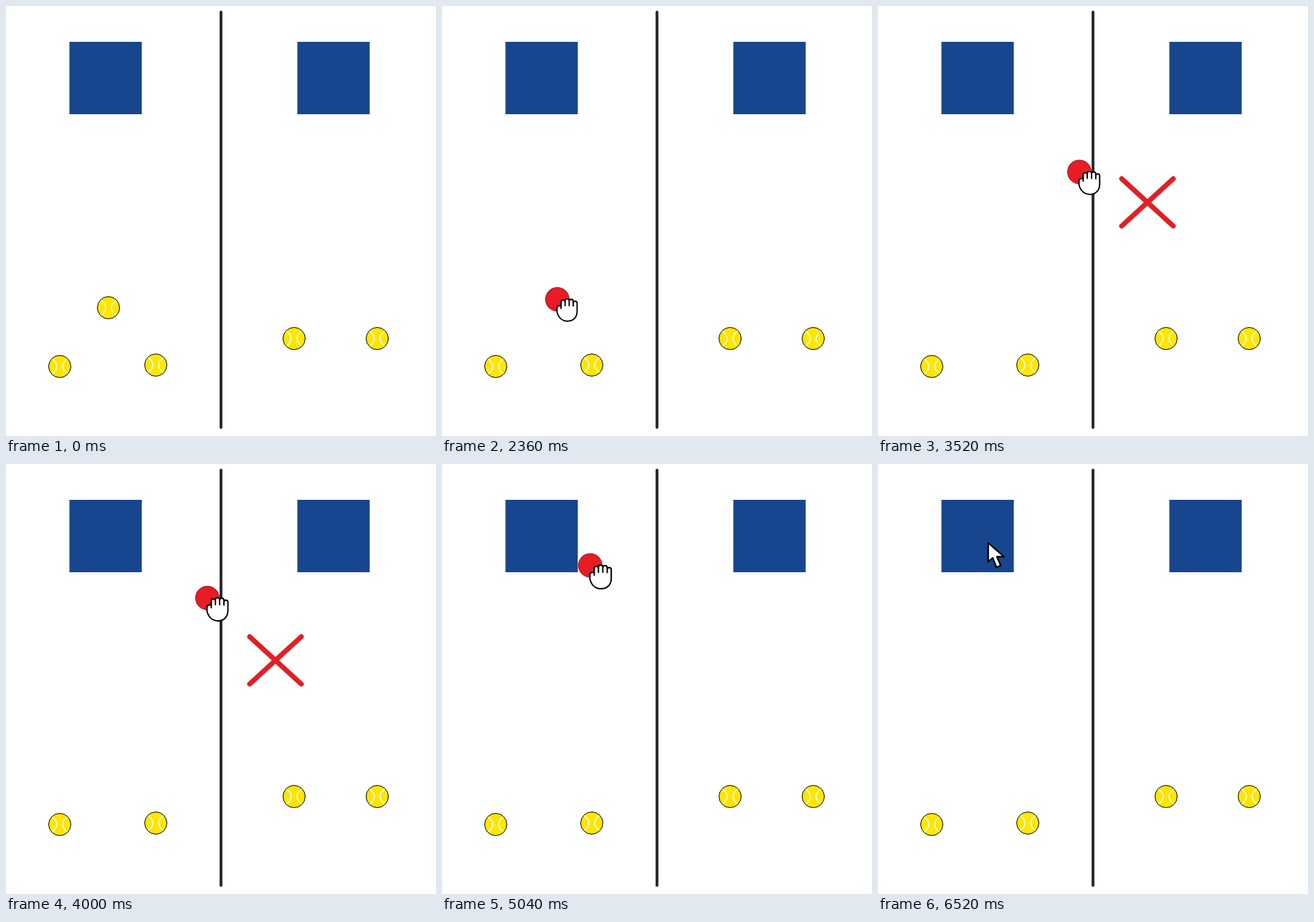
Animation, 600 px wide and 600 px high, one loop 7000 ms. Source, as an HTML page:

```html
<!DOCTYPE html>
<html lang="en">
<head>
<meta charset="utf-8">
<title>Drag and drop</title>
<style>
  html, body { margin: 0; width: 100%; height: 100%; overflow: hidden; background: #fff; }
  svg { display: block; width: 100vw; height: 100vh; }
  .cursor { fill: #fff; stroke: #000; stroke-width: 1.9; stroke-linejoin: round; stroke-linecap: round; }
  .mark { fill: none; stroke-width: 7; stroke-linecap: round; stroke-linejoin: round; }
</style>
</head>
<body>
<svg viewBox="0 0 600 600">
  <defs>
    <g id="tennis">
      <circle r="15.5" fill="#ffe600" stroke="#000"/>
      <path d="M-10.5-10.5Q2.5 0-10.5 10.5M10.5-10.5Q-2.5 0 10.5 10.5" fill="none" stroke="#fff" stroke-width="1.5"/>
    </g>
  </defs>

  <g fill="#17468f">
    <rect x="88.5" y="50" width="101" height="101"/>
    <rect x="406.5" y="50" width="101" height="101"/>
  </g>
  <path d="M300 8.5V588" stroke="#2d2d2f" stroke-width="4" stroke-linecap="round"/>

  <use href="#tennis" x="75" y="503"/>
  <use href="#tennis" x="209" y="501"/>
  <use href="#tennis" x="402" y="464"/>
  <use href="#tennis" x="518" y="464"/>
  <use href="#tennis" x="143" y="421" id="first"/>

  <path id="cross" class="mark" stroke="#e02024" d="M-36-33L36 33M36-33L-36 33"/>
  <path id="check" class="mark" stroke="#22b14c" d="M-32.5 4L-10 26L32.5-26"/>
  <circle id="ball" r="16.3" fill="#e81c24" stroke="#b5202b" stroke-width="1.4"/>

  <g class="cursor">
    <path id="arrow" stroke-width="2.3" fill="#f6f8ff" d="M0 0V26.5L6.3 21L11.6 34.2L17.6 31.6L12.2 19.4H22.2Z"/>
    <path id="point" d="M-2.8 22V3.2a2.8 2.8 0 0 1 5.6 0V12a2.6 2.6 0 0 1 5.2 0v1.4a2.6 2.6 0 0 1 5.2 0v1.5a2.6 2.6 0 0 1 5.2 0V23C18.4 31 13.4 36 7.4 36C1.9 36-1.6 33-4.1 29.5L-11.8 20.8C-13.8 18-10.1 16.5-8.1 17.8ZM2.8 12v5M8 13v4M13.2 14.5v3.5"/>
    <path id="grab" d="M5.3 13V4a2.8 2.8 0 0 1 5.6 0V2.4a2.9 2.9 0 0 1 5.8 0V3a2.9 2.9 0 0 1 5.8 0V5.5a2.7 2.7 0 0 1 5.4 0V17C27.9 26 22 31 14.5 31C7 31 1.5 26-.5 18V12.5C-.5 9 4 8.5 5.3 10ZM10.9 3v6M16.7 3v6M22.5 5v4.5"/>
  </g>
</svg>

<script>
const LOOP = 7000;
const GRAB = 1920, HIT = 2840, LEAVE = 4740, DROP = 5380;
const el = id => document.getElementById(id);
const [first, cross, check, ball, arrow, point, grab] =
  ['first', 'cross', 'check', 'ball', 'arrow', 'point', 'grab'].map(el);

const part = (t, a, b) => Math.min(1, Math.max(0, (t - a) / (b - a)));
const sine = p => (1 - Math.cos(Math.PI * p)) / 2;
const smooth = p => p * p * (3 - 2 * p);

// Point on a quadratic curve
const curve = (a, c, b, u) =>
  [0, 1].map(i => a[i] * (1 - u) ** 2 + 2 * u * (1 - u) * c[i] + b[i] * u * u);

// Height while held against the line: [time, y]
const slide = [[HIT, 285], [3320, 251.5], [3520, 231.5], [4040, 184], [4480, 157], [LEAVE, 150]];

function slope(i) {
  const a = slide[Math.max(0, i - 1)], b = slide[Math.min(slide.length - 1, i + 1)];
  return (b[1] - a[1]) / (b[0] - a[0]);
}

function slideY(t) {
  let i = 0;
  while (i < slide.length - 2 && t > slide[i + 1][0]) i++;
  const [t0, y0] = slide[i], [t1, y1] = slide[i + 1];
  const d = t1 - t0, u = (t - t0) / d, v = 1 - u;
  return y0 * (1 + 2 * u) * v * v + y1 * u * u * (3 - 2 * u)
    + d * u * v * (slope(i) * v - slope(i + 1) * u);
}

function ballAt(t) {
  if (t < HIT) return curve([143, 421], [226, 369], [281, 285], part(t, GRAB, HIT) ** 3);
  if (t < LEAVE) return [281, slideY(t)];
  return curve([281, 150], [187, 150], [147, 109], sine(part(t, LEAVE, DROP)));
}

function place(node, shown, [x, y] = [0, 0], scale = 1) {
  node.style.display = shown && scale > 0 ? '' : 'none';
  node.setAttribute('transform', `translate(${x} ${y}) scale(${scale})`);
}

const popScale = (t, on, off) =>
  smooth(part(t, on, on + 200)) * (1 - smooth(part(t, off, off + 200)));

function draw(t) {
  const held = t >= GRAB && t < DROP;
  const pos = ballAt(t);
  const burst = part(t, 5480, 6120);
  const tip = curve([274, 604], [175, 470], [151.5, 413], sine(part(t, 580, 1200)));
  const entering = t >= 600 && t < 1080;

  first.style.display = t < GRAB ? '' : 'none';
  place(ball, t >= GRAB && burst < 1, pos, 1 + 1.6 * burst);
  ball.style.opacity = 1 - burst;

  place(cross, true, [376, 274], popScale(t, 2554, 4560));
  place(check, true, [144, 214.5], popScale(t, 5356, 6320));

  place(arrow, entering || t >= DROP, entering ? tip : [153.7, 110]);
  place(point, t >= 1080 && t < GRAB, tip);
  place(grab, held, pos, 1 + 0.05 * (t - 2880) / 2160);
}

const start = performance.now();
function tick() {
  draw((performance.now() - start) % LOOP);
  requestAnimationFrame(tick);
}
tick();
</script>
</body>
</html>
```
